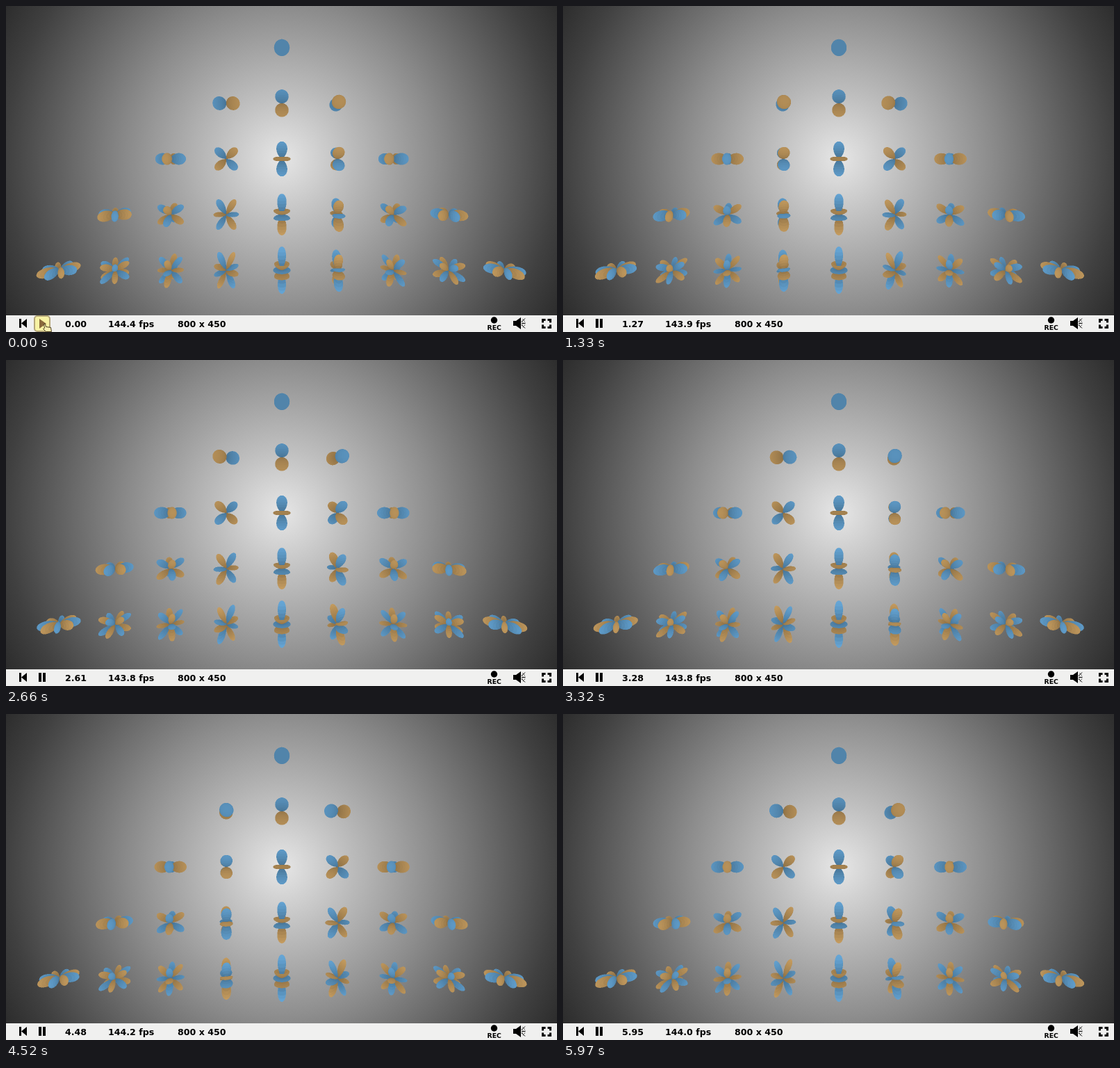
Write an HTML page with a canvas that moves like this. It is 793 px wide and 469 px high and loops after 6040 ms.

```html
<!DOCTYPE html>
<html lang="en">
<head>
<meta charset="utf-8">
<title>Spherical harmonics</title>
<style>
  html, body { margin: 0; width: 100%; height: 100%; overflow: hidden; background: #f0f0ef; }
  canvas { display: block; }
</style>
</head>
<body>
<canvas id="stage" width="793" height="469"></canvas>
<script>
const LOOP = 6040, FRAMES = 91, STEP = LOOP / FRAMES;
const W = 793, VIEW_H = 445, SS = 2;
const CX = 397, CY = 220, FOCAL = 400, EYE = 10;
const FPS = ['144.4', '143.9', '143.9', '143.8', '144.2', '143.9', '144.0'];
const BLUE = [101, 165, 213], ORANGE = [202, 160, 98];

const ctx = document.getElementById('stage').getContext('2d');
const layer = document.createElement('canvas');
layer.width = W * SS;
layer.height = VIEW_H * SS;
const layerCtx = layer.getContext('2d');
const image = layerCtx.createImageData(layer.width, layer.height);
const pixels = new Uint32Array(image.data.buffer);
const depth = new Float32Array(pixels.length);

const factorial = n => n < 2 ? 1 : n * factorial(n - 1);

// Associated Legendre polynomial, Condon-Shortley phase included
function legendre(l, m, c, s) {
  let prev = 0, cur = 1;
  for (let i = 1; i <= m; i++) cur *= -(2 * i - 1) * s;
  for (let n = m + 1; n <= l; n++) {
    [prev, cur] = [cur, ((2 * n - 1) * c * cur - (n + m - 1) * prev) / (n - m)];
  }
  return cur;
}

function shade(value) {
  const k = Math.min(1, 0.68 + 0.42 * Math.abs(value));
  const [r, g, b] = (value < 0 ? ORANGE : BLUE).map(v => Math.round(v * k));
  return (0xff000000 | b << 16 | g << 8 | r) >>> 0;
}

function makeMesh(l, column) {
  const m = Math.abs(column), rows = 16 + 8 * l, cols = rows * 2;
  const norm = Math.sqrt((m ? 2 : 1) * (2 * l + 1) / (4 * Math.PI) * factorial(l - m) / factorial(l + m));
  const verts = [], values = [], quads = [];
  for (let i = 0; i <= rows; i++) {
    const theta = Math.PI * i / rows, c = Math.cos(theta), s = Math.sin(theta);
    const p = norm * legendre(l, m, c, s);
    for (let j = 0; j <= cols; j++) {
      const a = 2 * Math.PI * j / cols;
      const value = p * (column > 0 ? Math.sin(m * a) : Math.cos(m * a));
      const r = Math.abs(value);
      values.push(value);
      verts.push(r * s * Math.cos(a), r * c, r * s * Math.sin(a));
    }
  }
  for (let i = 0; i < rows; i++) {
    for (let j = 0; j < cols; j++) {
      const a = i * (cols + 1) + j, b = a + cols + 1;
      const mean = (values[a] + values[a + 1] + values[b] + values[b + 1]) / 4;
      quads.push(a, a + 1, b, b + 1, shade(mean));
    }
  }
  return {
    x: column * 2, y: 4 - 2 * l,
    verts: Float32Array.from(verts), quads: Uint32Array.from(quads),
    screen: new Float32Array(verts.length)
  };
}

const meshes = [];
for (let l = 0; l <= 4; l++) {
  for (let column = -l; column <= l; column++) meshes.push(makeMesh(l, column));
}

function triangle(v, a, b, c, color) {
  a *= 3; b *= 3; c *= 3;
  const ax = v[a], ay = v[a + 1], bx = v[b], by = v[b + 1], cx = v[c], cy = v[c + 1];
  const area = (bx - ax) * (cy - ay) - (by - ay) * (cx - ax);
  if (Math.abs(area) < 1e-6) return;
  const x0 = Math.ceil(Math.min(ax, bx, cx) - 0.5), x1 = Math.floor(Math.max(ax, bx, cx) - 0.5);
  const y0 = Math.ceil(Math.min(ay, by, cy) - 0.5), y1 = Math.floor(Math.max(ay, by, cy) - 0.5);
  for (let y = y0; y <= y1; y++) {
    for (let x = x0; x <= x1; x++) {
      const px = x + 0.5 - ax, py = y + 0.5 - ay;
      const u = (px * (cy - ay) - py * (cx - ax)) / area;
      const w = (py * (bx - ax) - px * (by - ay)) / area;
      if (u < -1e-4 || w < -1e-4 || u + w > 1.0001) continue;
      const z = v[a + 2] * (1 - u - w) + v[b + 2] * u + v[c + 2] * w;
      const at = y * layer.width + x;
      if (z < depth[at]) {
        depth[at] = z;
        pixels[at] = color;
      }
    }
  }
}

function drawMesh({ x, y, verts, quads, screen }, angle) {
  const c = Math.cos(angle), s = Math.sin(angle);
  for (let i = 0; i < verts.length; i += 3) {
    const vx = verts[i], vz = verts[i + 2];
    const z = EYE - (vx * s + vz * c);
    screen[i] = SS * (CX + FOCAL * (x + vx * c - vz * s) / z);
    screen[i + 1] = SS * (CY - FOCAL * (y + verts[i + 1]) / z);
    screen[i + 2] = z;
  }
  for (let i = 0; i < quads.length; i += 5) {
    triangle(screen, quads[i], quads[i + 1], quads[i + 2], quads[i + 4]);
    triangle(screen, quads[i + 1], quads[i + 3], quads[i + 2], quads[i + 4]);
  }
}

const backdrop = ctx.createRadialGradient(CX, CY, 0, CX, CY, 456);
[[0, 230], [0.2, 191], [0.48, 140], [0.87, 64], [1, 44]].forEach(([at, v]) =>
  backdrop.addColorStop(at, `rgb(${v},${v},${v})`));

function poly(points, fill, stroke) {
  ctx.beginPath();
  for (let i = 0; i < points.length; i += 2) ctx.lineTo(points[i], points[i + 1]);
  ctx.closePath();
  ctx.fillStyle = fill;
  ctx.fill();
  if (stroke) {
    ctx.strokeStyle = stroke;
    ctx.lineWidth = 1;
    ctx.stroke();
  }
}

function text(str, x, y, size) {
  ctx.font = `bold ${size}px "DejaVu Sans", sans-serif`;
  ctx.fillStyle = '#000';
  ctx.fillText(str, x, y);
}

function drawPlayButton() {
  ctx.beginPath();
  ctx.roundRect(41, 446, 22, 22, 4);
  ctx.fillStyle = '#f8f3a4';
  ctx.fill();
  ctx.strokeStyle = '#b3a578';
  ctx.lineWidth = 2;
  ctx.stroke();
  poly([48, 450, 58, 457, 48, 464], '#8a6a3c');
  poly([54.5, 457.5, 56.5, 457.5, 57.5, 461.5, 64.5, 462.5, 65.5, 468.5, 57.5, 468.5, 53.5, 464.5, 55.5, 463.5],
    '#f8f0b0', '#4a3c20');
}

function drawBar(frame, clock) {
  ctx.fillStyle = '#f0f0ef';
  ctx.fillRect(0, VIEW_H, W, 24);
  ctx.fillStyle = '#000';
  ctx.fillRect(19, 450, 3, 13);
  poly([22, 456.5, 30, 450, 30, 463], '#000');
  if (frame) {
    ctx.fillRect(47, 450, 4, 13);
    ctx.fillRect(53, 450, 4, 13);
  } else {
    drawPlayButton();
  }

  text(clock.toFixed(2), 85, 462, 12.6);
  text(FPS[Math.floor(clock + 0.4)] + ' fps', 147, 462, 12.6);
  text('800 x 450', 247, 462, 12.6);

  ctx.beginPath();
  ctx.arc(702.5, 452, 4.7, 0, 2 * Math.PI);
  ctx.fill();
  text('REC', 692.5, 466, 9.3);

  poly([730, 453, 734, 453, 741, 448, 741, 465, 734, 460, 730, 460], '#000');
  ctx.strokeStyle = '#000';
  ctx.lineWidth = 1;
  ctx.setLineDash([1.5, 1.5]);
  [3, 6].forEach(r => {
    ctx.beginPath();
    ctx.arc(740.5, 456.5, r + 0.5, -1.1, 1.1);
    ctx.stroke();
  });
  ctx.setLineDash([]);
  for (const dy of [-1, 0, 1]) {
    ctx.beginPath();
    ctx.moveTo(742, 456.5 + dy * 2);
    ctx.lineTo(747, 456.5 + dy * 7);
    ctx.stroke();
  }

  for (const sx of [-1, 1]) {
    for (const sy of [-1, 1]) {
      const x = 778 + sx * 7, y = 457 + sy * 7;
      poly([x, y, x - sx * 5.5, y, x - sx * 5.5, y - sy * 3, x - sx * 3, y - sy * 3,
        x - sx * 3, y - sy * 5.5, x, y - sy * 5.5], '#000');
    }
  }
}

function draw(frame) {
  const clock = Math.max(0, frame * 0.06684 - 0.0622);
  pixels.fill(0);
  depth.fill(1e9);
  for (const mesh of meshes) drawMesh(mesh, clock);
  layerCtx.putImageData(image, 0, 0);

  ctx.fillStyle = backdrop;
  ctx.fillRect(0, 0, W, VIEW_H);
  ctx.drawImage(layer, 0, 0, W, VIEW_H);
  drawBar(frame, clock);
}

let shown = -1;
const start = performance.now();
function tick() {
  const t = (performance.now() - start) % LOOP;
  const frame = Math.min(FRAMES - 1, Math.floor((t + 5) / STEP));
  if (frame !== shown) {
    shown = frame;
    draw(frame);
  }
  requestAnimationFrame(tick);
}
tick();
</script>
</body>
</html>
```
